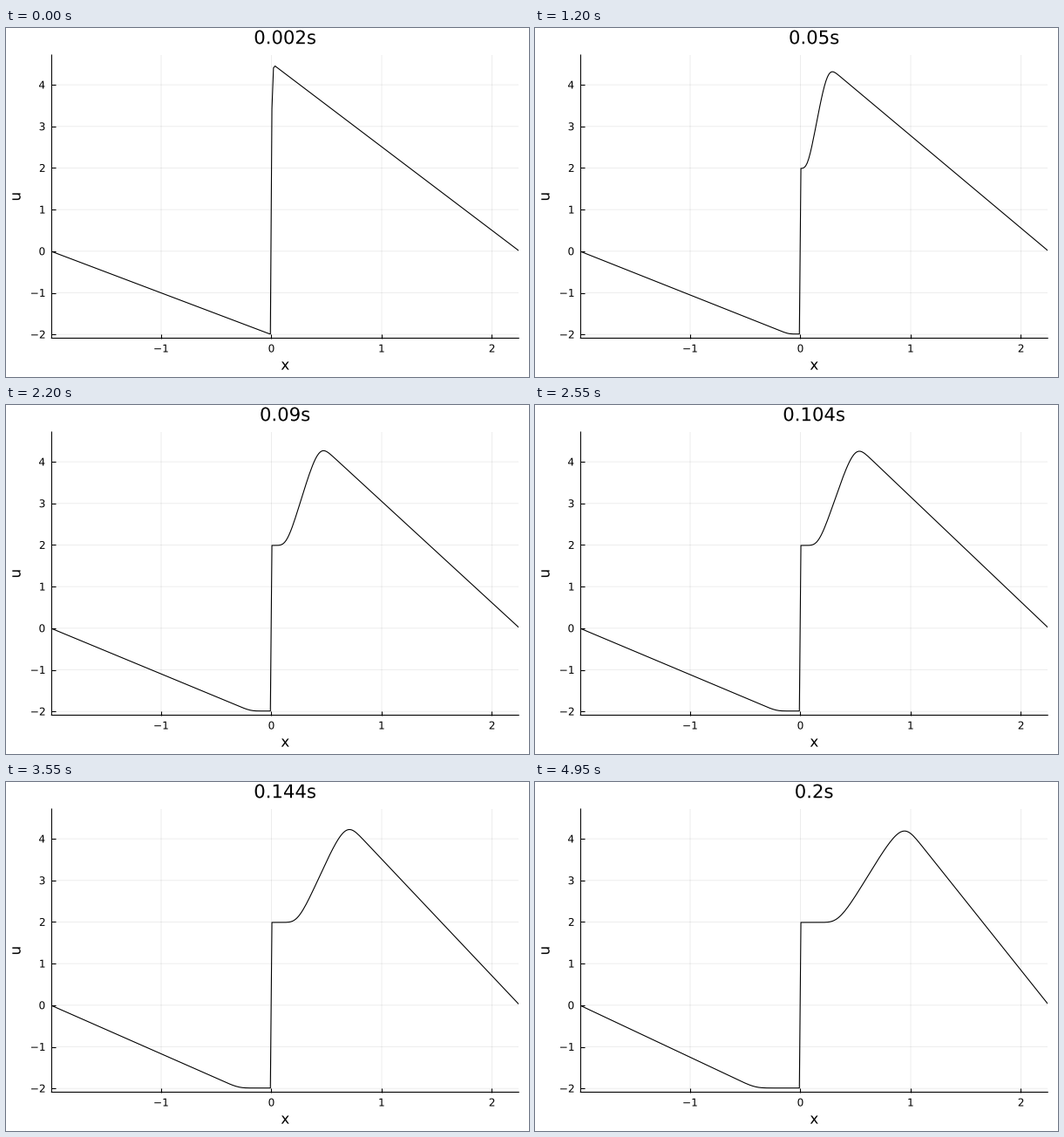
Animation, 600 px wide and 400 px high, one loop 5 s. Source, as a matplotlib script:

```python
import numpy as np
import matplotlib.pyplot as plt
from matplotlib.animation import FuncAnimation
from matplotlib.patches import PathPatch
from matplotlib.textpath import TextPath
from matplotlib.transforms import Affine2D

W, H, DPI = 600, 400, 100
FRAMES, INTERVAL = 100, 50
LEFT, RIGHT, TOP, BOTTOM = 52.4, 588.2, 31.0, 355.5
PX = 72 / DPI  # points per pixel

SAVE_DT, CFL = 0.002, 0.55
CELLS = 300
DX = 4.25 / CELLS

plt.rcParams["font.family"] = "DejaVu Sans"


def advance(u, duration):
    """Upwind (Roe) steps of Burgers' equation, without entropy fix."""
    left = duration
    while left > 1e-12:
        dt = min(left, CFL * DX / np.abs(u).max())
        v = np.pad(u, 1, mode="edge")
        f = v * v / 2
        flux = np.where(v[:-1] + v[1:] > 0, f[:-1], f[1:])
        u = u - dt / DX * np.diff(flux)
        left -= dt
    return u


x = -2 + DX * (np.arange(CELLS) + 0.5)
u = np.where(x < 0, -(x + 2), 4.5 - 2 * x)
y_min, y_max = 1.05 * u.min(), 1.05 * u.max()
states = []
for _ in range(FRAMES):
    u = advance(u, SAVE_DT)
    states.append(u)

fig = plt.figure(figsize=(W / DPI, H / DPI), dpi=DPI, facecolor="white")
ax = fig.add_axes([LEFT / W, 1 - BOTTOM / H, (RIGHT - LEFT) / W, (BOTTOM - TOP) / H])
ax.set_xlim(x[0], x[-1])
ax.set_ylim(y_min, y_max)
ax.spines[["top", "right"]].set_visible(False)
ax.spines[["left", "bottom"]].set(linewidth=1.1 * PX, snap=False)
ax.set_axisbelow(True)
ax.grid(color="black", alpha=0.07, linewidth=PX, snap=False)
ax.tick_params(direction="in", length=5 * PX, width=1.1 * PX,
               labelbottom=False, labelleft=False)
x_ticks, y_ticks = range(-1, 3), range(-2, 5)
ax.set_xticks(x_ticks)
ax.set_yticks(y_ticks)
for line in ax.get_xticklines() + ax.get_yticklines():
    line.set_snap(False)


def outline(text, size, align=0.5):
    """Glyph outlines on the baseline; align 0.5 is centred, 1 is right."""
    path = TextPath((0, 0), text, size=size)
    box = path.get_extents()
    return Affine2D().translate(-box.x0 - align * box.width, 0).transform_path(path)


def label(px, py, text, size, align=0.5, angle=0):
    place = Affine2D().rotate_deg(angle).translate(px, H - py).scale(1 / W, 1 / H)
    patch = PathPatch(outline(text, size, align), facecolor="black", linewidth=0,
                      snap=False, transform=place + fig.transFigure)
    return fig.add_artist(patch)


def number(n):
    return str(n).replace("-", "\u2212")


def time_text(i):
    return f"{round((i + 1) * SAVE_DT, 3):g}s"


TICK, GUIDE, TITLE = 12.1, 16.8, 21.2
MID_X, MID_Y = (LEFT + RIGHT) / 2, (TOP + BOTTOM) / 2
for n in x_ticks:
    px = LEFT + (n - x[0]) / (x[-1] - x[0]) * (RIGHT - LEFT)
    label(px, 371.5, number(n), TICK)
for n in y_ticks:
    py = BOTTOM - (n - y_min) / (y_max - y_min) * (BOTTOM - TOP)
    label(44.4, py + 4.4, number(n), TICK, align=1)
label(MID_X, 391.6, "x", GUIDE)
label(16.5, MID_Y, "u", GUIDE, angle=90)
title = label(MID_X, 18.2, time_text(0), TITLE)

curve, = ax.plot([], [], color="black", linewidth=1.1 * PX,
                 solid_joinstyle="round", snap=False)


def draw(i):
    curve.set_data(x, states[i])
    title.set_path(outline(time_text(i), TITLE))
    return curve, title


anim = FuncAnimation(fig, draw, frames=FRAMES, interval=INTERVAL,
                     init_func=lambda: draw(0), repeat=True, repeat_delay=0)
plt.show()
```
